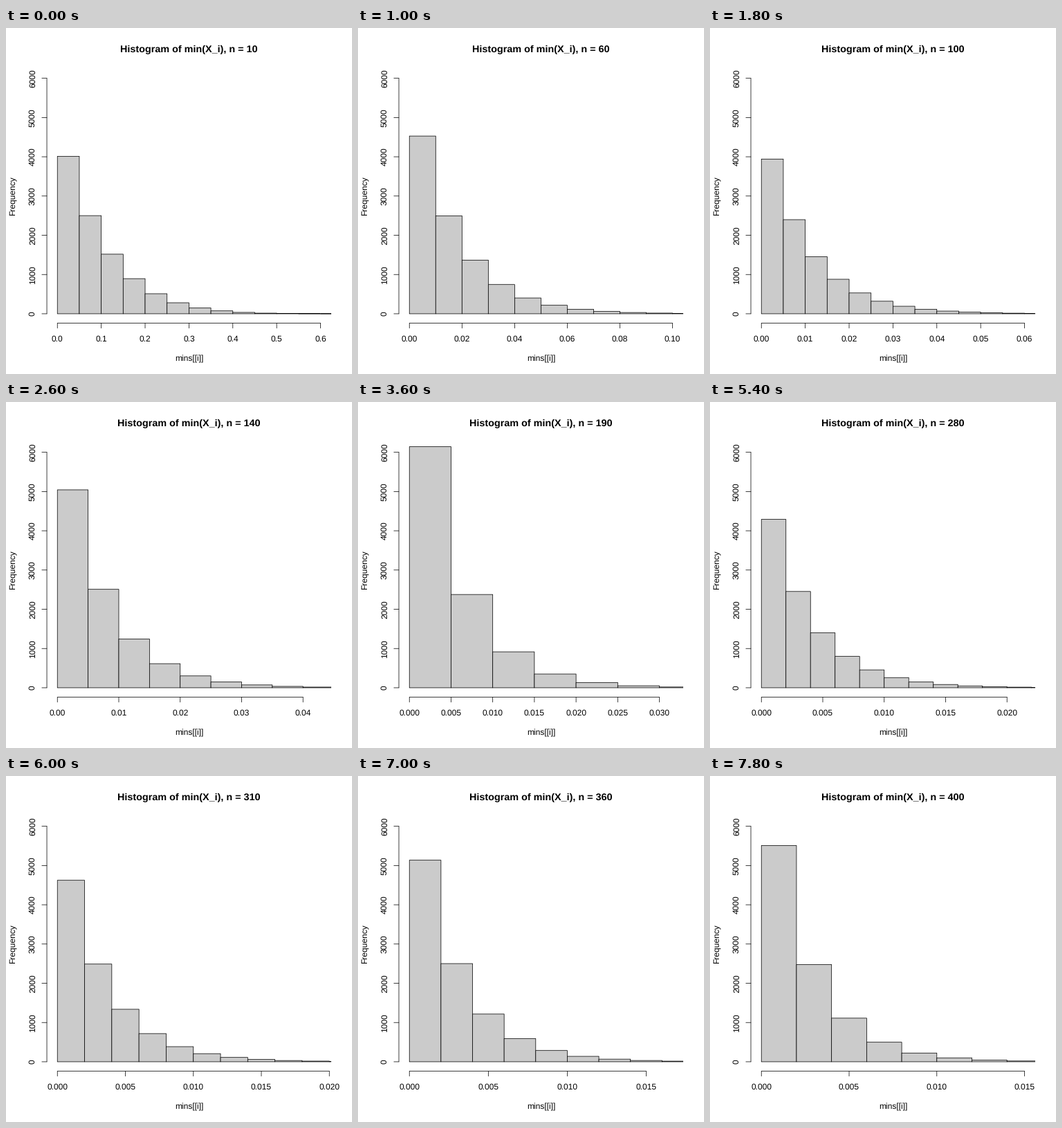
Animation, 500 px wide and 500 px high, one loop 8 s. Source, as a matplotlib script:

```python
import math

import matplotlib.pyplot as plt
from matplotlib.animation import FuncAnimation
from matplotlib.patches import Rectangle

SIZE, DPI = 500, 100
FRAMES, INTERVAL = 40, 200
SAMPLES = 10000
PT = 72 / DPI  # points per pixel
LINE = 0.75 * PT

# Plot region in pixels, y up, padded by 4% on every side
LEFT, RIGHT = 59.04, 469.76
BOTTOM, TOP = 73.44, 440.96
SPAN_X = (RIGHT - LEFT) / 1.08
SPAN_Y = (TOP - BOTTOM) / 1.08
X0 = LEFT + 0.04 * SPAN_X
Y0 = BOTTOM + 0.04 * SPAN_Y
Y_MAX = 6000
TICK = 7.2

plt.rcParams["text.hinting"] = "none"
fig = plt.figure(figsize=(SIZE / DPI, SIZE / DPI), dpi=DPI, facecolor="white")
ax = fig.add_axes([0, 0, 1, 1])
ax.set_xlim(0, SIZE)
ax.set_ylim(0, SIZE)
ax.axis("off")
region = Rectangle((LEFT, BOTTOM), RIGHT - LEFT, TOP - BOTTOM,
                   transform=ax.transData)
live = []


def label(x, y, s, px=12, angle=0, weight="normal"):
    return ax.text(x, y, s, family="Liberation Sans", size=px * PT,
                   weight=weight, rotation=angle, rotation_mode="anchor",
                   ha="center", va="baseline", color="black")


def line(xs, ys):
    return ax.plot(xs, ys, color="black", lw=LINE, snap=False,
                   solid_capstyle="round")[0]


def pretty_step(cell, bias, bias5):
    """Round a cell width to 1, 2, 5 or 10 times a power of ten."""
    base = 10 ** math.floor(math.log10(cell))
    unit = base
    for mult, b in ((2, bias), (5, bias5), (10, bias)):
        if mult * base - cell < b * (cell - unit):
            unit = mult * base
        else:
            break
    return unit


def bin_width(n):
    largest = 1 - math.exp(-9.58 / n)  # median of the largest minimum
    return pretty_step(largest / 15, 1.5, 2.75)


def count(n, lo, hi):
    """Expected number of minima of n uniform draws between lo and hi."""
    return SAMPLES * (max(0, 1 - lo) ** n - max(0, 1 - hi) ** n)


def draw_bars(n, x_max):
    w = bin_width(n)
    px = w / x_max * SPAN_X
    for i in range(math.ceil(1.04 * x_max / w)):
        height = count(n, i * w, (i + 1) * w) / Y_MAX * SPAN_Y
        bar = Rectangle((X0 + i * px, Y0), px, height, fc="#cbcbcb",
                        ec="black", lw=LINE, snap=False, joinstyle="round")
        ax.add_patch(bar)
        bar.set_clip_path(region)
        live.append(bar)


def draw_x_axis(x_max):
    step = pretty_step(1.08 * x_max / 5, 0.8, 1.7)
    digits = -math.floor(math.log10(step) + 1e-9)
    last = math.floor(1.04 * x_max / step + 1e-9)
    xs = [X0 + k * step / x_max * SPAN_X for k in range(last + 1)]
    live.append(line([xs[0], xs[-1]], [BOTTOM, BOTTOM]))
    for k, x in enumerate(xs):
        live.append(line([x, x], [BOTTOM, BOTTOM - TICK]))
        live.append(label(x, 47.3, f"{k * step:.{digits}f}"))


def draw_y_axis():
    line([LEFT, LEFT], [Y0, Y0 + SPAN_Y])
    for v in range(0, Y_MAX + 1, 1000):
        y = Y0 + v / Y_MAX * SPAN_Y
        line([LEFT, LEFT - TICK], [y, y])
        label(41.8, y, str(v), angle=90)


def clear():
    while live:
        live.pop().remove()
    return []


def update(frame):
    clear()
    n = 10 * (frame + 1)
    x_max = 6 / n
    title.set_text(f"Histogram of min(X_i), n = {n}")
    draw_bars(n, x_max)
    draw_x_axis(x_max)
    return live


MID_X, MID_Y = (LEFT + RIGHT) / 2, (BOTTOM + TOP) / 2
title = label(MID_X, 465.2, "", px=14.4, weight="bold")
label(MID_X, 18.4, "mins[[i]]")
label(12.96, MID_Y, "Frequency", angle=90)
draw_y_axis()

anim = FuncAnimation(fig, update, frames=FRAMES, init_func=clear,
                     interval=INTERVAL, repeat=True, repeat_delay=0,
                     blit=False)
plt.show()
```
